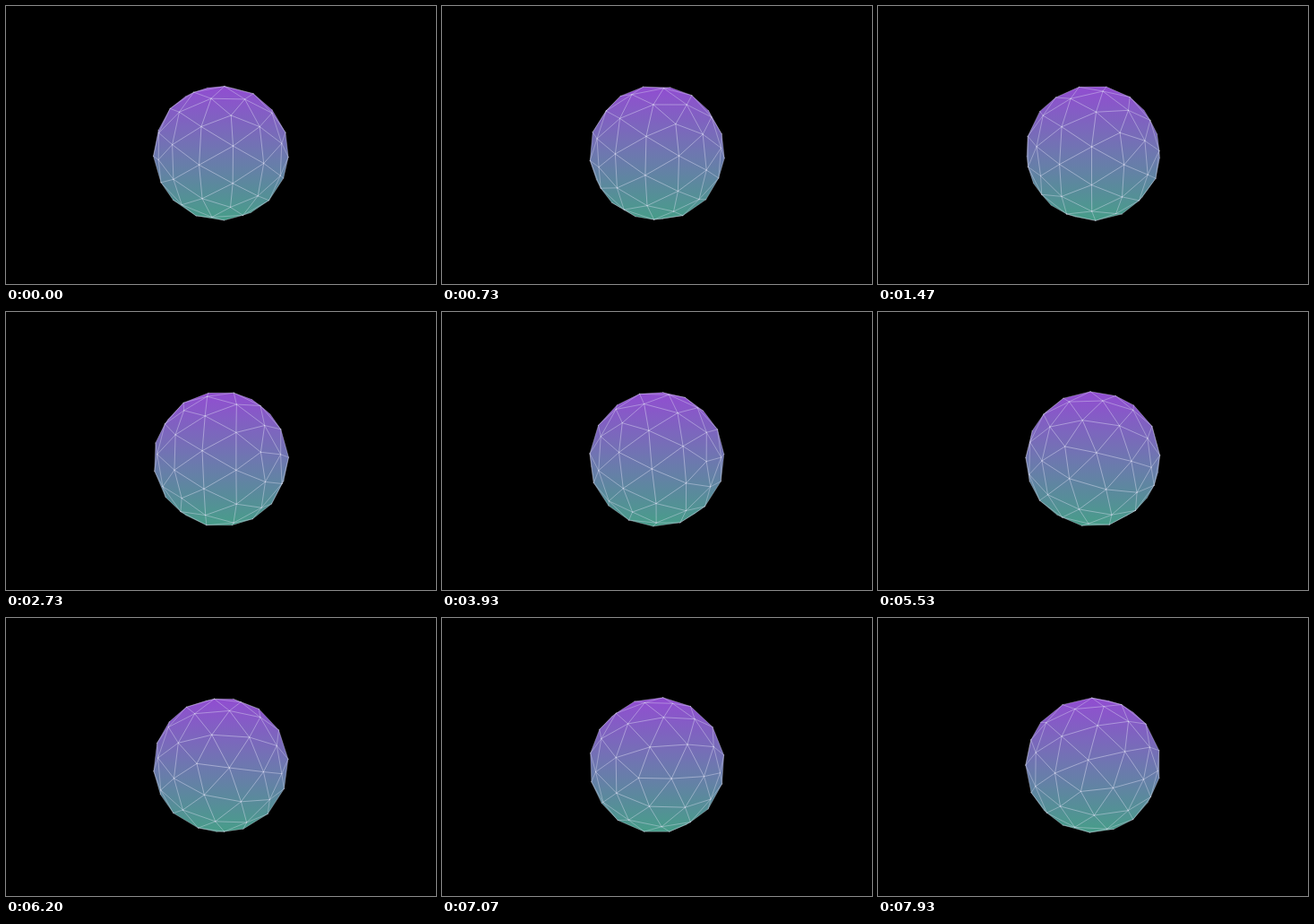
These frames come from a looping animation (480x310 px, 8000 ms). An HTML page with a canvas:

```html
<!DOCTYPE html>
<html lang="en">
<head>
<meta charset="utf-8">
<title>Rotating icosphere</title>
<style>
  html, body { margin: 0; width: 100%; height: 100%; overflow: hidden; background: #000; }
  canvas { display: block; }
</style>
</head>
<body>
<canvas id="stage" width="480" height="310"></canvas>
<script>
const ctx = document.getElementById('stage').getContext('2d');
const LOOP = 8000, STEP = 1000 / 15;
const CX = 240, CY = 164, CAMERA = 3, FOCAL = 213.7;
const SPLIT = 3;

const dot = (a, b) => a[0] * b[0] + a[1] * b[1] + a[2] * b[2];
const sub = (a, b) => a.map((v, i) => v - b[i]);
const cross = (a, b) => [
  a[1] * b[2] - a[2] * b[1],
  a[2] * b[0] - a[0] * b[2],
  a[0] * b[1] - a[1] * b[0]
];
const unit = a => a.map(v => v / Math.hypot(...a));

function icosahedron() {
  const g = (1 + Math.sqrt(5)) / 2, corners = [];
  for (const s of [-1, 1]) for (const r of [-g, g]) {
    corners.push(unit([s, r, 0]), unit([0, s, r]), unit([r, 0, s]));
  }
  const near = (a, b) => dot(a, b) > 0.4;
  const faces = [];
  corners.forEach((a, i) => corners.forEach((b, j) => corners.forEach((c, k) => {
    if (i < j && j < k && near(a, b) && near(b, c) && near(a, c)) {
      faces.push(dot(cross(sub(b, a), sub(c, a)), a) > 0 ? [a, b, c] : [a, c, b]);
    }
  })));
  return faces;
}

const points = [], faces = [], edges = new Map(), ids = new Map();

function pointId(p) {
  const key = p.map(v => Math.round(v * 1e4)).join();
  if (!ids.has(key)) {
    ids.set(key, points.length);
    points.push(p);
  }
  return ids.get(key);
}

function addFace(...ring) {
  const f = faces.push(ring) - 1;
  ring.forEach((a, i) => {
    const b = ring[(i + 1) % 3];
    const key = Math.min(a, b) + '-' + Math.max(a, b);
    if (!edges.has(key)) edges.set(key, { a, b, sides: [] });
    edges.get(key).sides.push(f);
  });
}

for (const [a, b, c] of icosahedron()) {
  const at = (i, j) => pointId(unit(a.map((v, n) =>
    v * (SPLIT - i - j) + b[n] * i + c[n] * j)));
  for (let i = 0; i < SPLIT; i++) {
    for (let j = 0; i + j < SPLIT; j++) {
      addFace(at(i, j), at(i + 1, j), at(i, j + 1));
      if (i + j < SPLIT - 1) addFace(at(i + 1, j), at(i + 1, j + 1), at(i, j + 1));
    }
  }
}

// Turn about y, then about x, by the same angle.
function rotate([x, y, z], angle) {
  const c = Math.cos(angle), s = Math.sin(angle);
  const z1 = z * c - x * s;
  return [x * c + z * s, y * c - z1 * s, y * s + z1 * c];
}

function project([x, y, z]) {
  const k = FOCAL / (CAMERA - z);
  return [CX + x * k, CY - y * k];
}

const shade = ctx.createLinearGradient(0, 88, 0, 240);
shade.addColorStop(0, 'rgb(146,76,210)');
shade.addColorStop(0.5, 'rgb(110,119,176)');
shade.addColorStop(1, 'rgb(70,158,136)');

function draw(time) {
  const tick = Math.floor((time % LOOP + 3.4) / STEP);
  const turned = points.map(p => rotate(p, 0.13 + 0.01 * tick));
  const flat = turned.map(project);
  const visible = faces.map(([a, b, c]) => {
    const [p, q, r] = [turned[a], turned[b], turned[c]];
    return dot(cross(sub(q, p), sub(r, p)), sub([0, 0, CAMERA], p)) > 0;
  });

  ctx.fillStyle = '#000';
  ctx.fillRect(0, 0, 480, 310);

  ctx.beginPath();
  faces.forEach((ring, i) => {
    if (!visible[i]) return;
    ring.forEach((id, n) => n ? ctx.lineTo(...flat[id]) : ctx.moveTo(...flat[id]));
    ctx.closePath();
  });
  ctx.fillStyle = shade;
  ctx.fill();

  ctx.lineWidth = 0.9;
  ctx.lineCap = 'round';
  for (const { a, b, sides } of edges.values()) {
    if (!sides.some(f => visible[f])) continue;
    const depth = (turned[a][2] + turned[b][2]) / 2;
    ctx.strokeStyle = `rgba(225,225,245,${0.24 + 0.3 * Math.max(0, depth)})`;
    ctx.beginPath();
    ctx.moveTo(...flat[a]);
    ctx.lineTo(...flat[b]);
    ctx.stroke();
  }
}

const start = performance.now();
function frame() {
  draw(performance.now() - start);
  requestAnimationFrame(frame);
}
frame();
</script>
</body>
</html>
```
